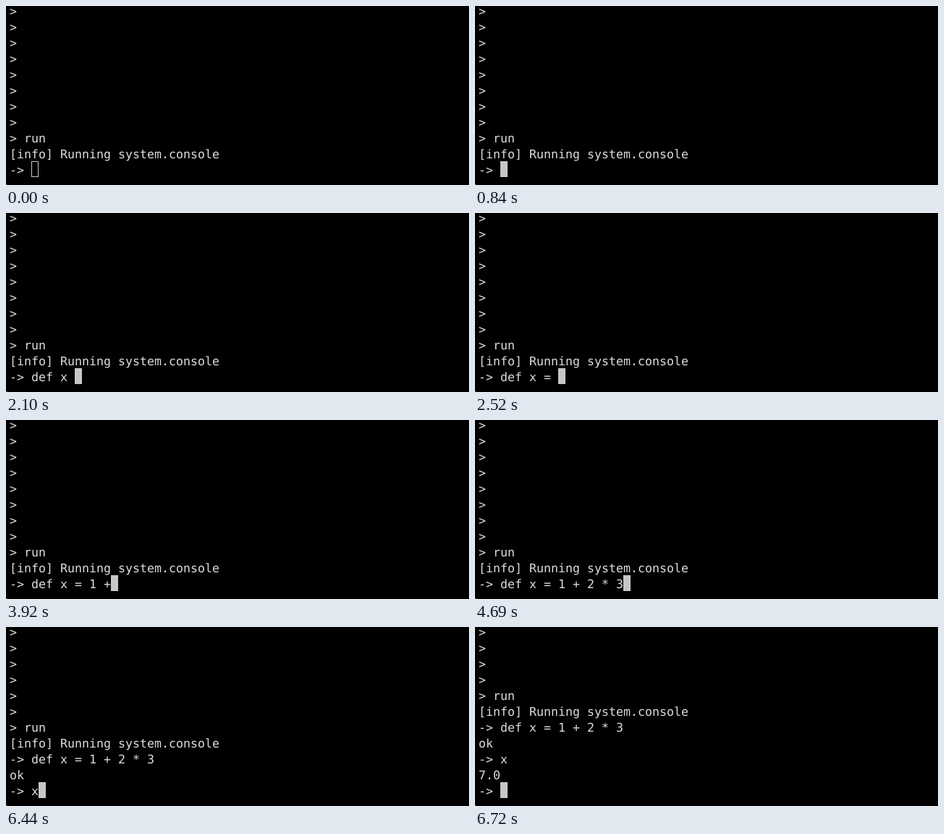
Write an HTML page that moves like this. It is 640 by 248 pixels and loops after 7.91 s.

```html
<!DOCTYPE html>
<html lang="en">
<head>
<meta charset="utf-8">
<title>Console session</title>
<style>
  html, body { margin: 0; width: 100%; height: 100%; overflow: hidden; background: #000; }
  svg { display: block; width: 640px; height: 248px; background: #000; }
  text {
    font: 16.61px "DejaVu Sans Mono", monospace;
    fill: #dcdcdc;
    white-space: pre;
    text-rendering: geometricPrecision;
  }
</style>
</head>
<body>
<svg viewBox="0 0 640 248">
  <path d="M0 245.5Q0 248 2.5 248H0Z" fill="#999"/>
  <rect id="cursor"/>
  <g id="rows"></g>
</svg>
<script>
const LOOP = 7910, ROWS = 11, COLUMN = 10, LINE = 22, LEFT = 5, BASELINE = 13;
const FOCUS_TIME = 770;
const cursor = document.getElementById("cursor");
const rowGroup = document.getElementById("rows");

// Each command: characters, the time of each key, the time of Enter and the reply.
const commands = [
  {
    text: "def x = 1 + 2 * 3",
    keys: [1050, 1190, 1330, 1400, 1610, 1820, 2450, 2520, 2870, 3010,
           3920, 3990, 4060, 4200, 4550, 4620, 4690],
    enter: 5530,
    reply: "ok"
  },
  { text: "x", keys: [6160], enter: 6720, reply: "7.0" }
];

const rows = Array.from({ length: ROWS }, (_, i) => {
  const row = document.createElementNS("http://www.w3.org/2000/svg", "text");
  row.setAttribute("x", LEFT);
  row.setAttribute("y", BASELINE + i * LINE);
  return rowGroup.appendChild(row);
});

function setAttributes(element, values) {
  for (const name in values) element.setAttribute(name, values[name]);
}

function linesAt(time) {
  const lines = [...Array(8).fill(">"), "> run", "[info] Running system.console"];
  for (const { text, keys, enter, reply } of commands) {
    const typed = keys.filter(key => key <= time).length;
    lines.push("-> " + text.slice(0, typed));
    if (time < enter) return lines;
    lines.push(reply);
  }
  return [...lines, "-> "];
}

function drawCursor(column, focused) {
  const x = LEFT + column * COLUMN, y = 215;
  setAttributes(cursor, focused
    ? { x, y, width: COLUMN, height: LINE, fill: "#c7c7c7", stroke: "none" }
    : { x: x + 0.5, y: y + 0.5, width: COLUMN - 1, height: LINE - 1, fill: "none", stroke: "#c7c7c7" });
}

function draw(now) {
  const time = now % LOOP;
  const lines = linesAt(time).slice(-ROWS);
  rows.forEach((row, i) => {
    if (row.textContent !== lines[i]) row.textContent = lines[i];
  });
  drawCursor(lines[ROWS - 1].length, time >= FOCUS_TIME);
}

const start = performance.now();
function tick() {
  draw(performance.now() - start);
  requestAnimationFrame(tick);
}
tick();
</script>
</body>
</html>
```
